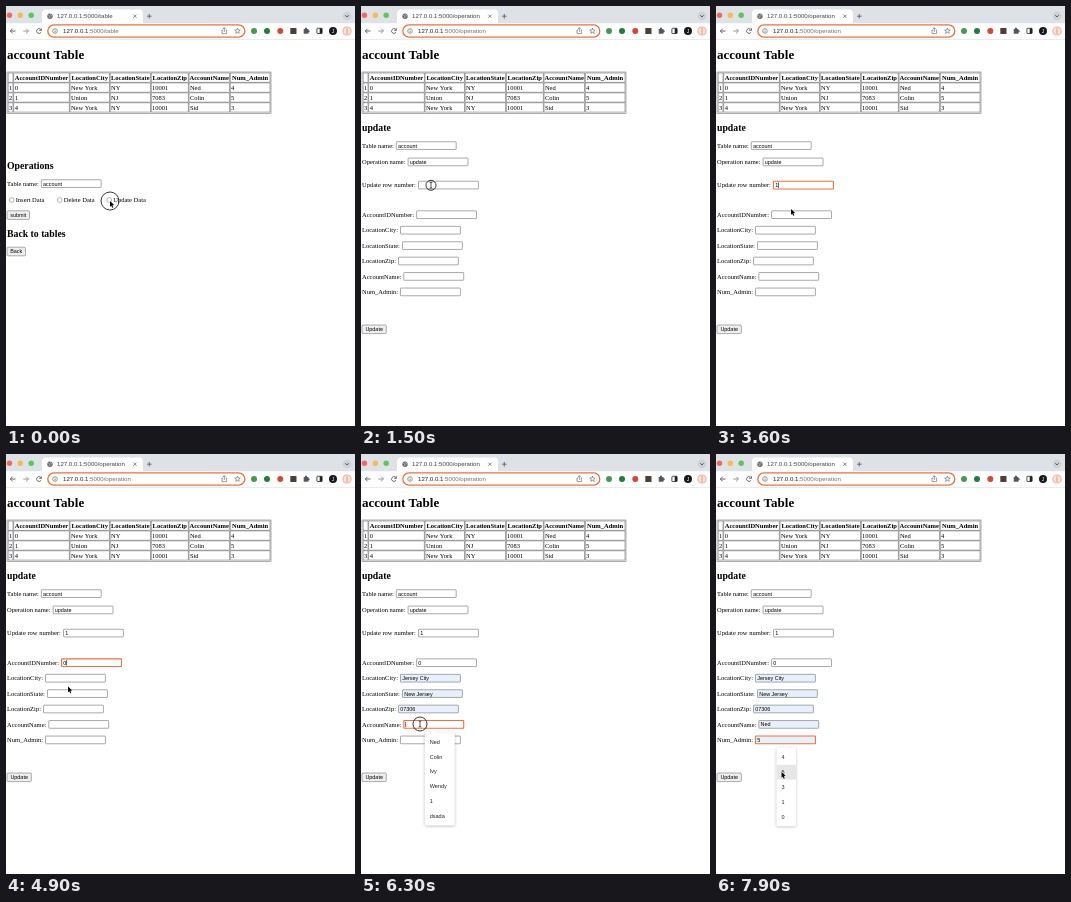
Write an HTML page with a canvas that moves like this. It is 349 px wide and 420 px high and loops after 8 s.

```html
<!DOCTYPE html>
<html lang="en">
<head>
<meta charset="utf-8">
<title>Table update form</title>
<style>
html, body { margin: 0; width: 349px; height: 420px; overflow: hidden; background: #fff; }
canvas { display: block; }
</style>
</head>
<body>
<canvas id="stage" width="349" height="420"></canvas>
<script>
const ctx = document.getElementById('stage').getContext('2d');
const LOOP = 8000;
const PAGE_SWITCH = 700;
const SANS = '"Liberation Sans", Arial, sans-serif';
const SERIF = '"Liberation Serif", "Times New Roman", serif';
const ACCENT = '#e8743f';
const FIELD_W = 60.5, FIELD_H = 8.5, ITEM_H = 14.85;

const columns = ['AccountIDNumber', 'LocationCity', 'LocationState', 'LocationZip', 'AccountName', 'Num_Admin'];
const edges = [1.7, 7.4, 63.6, 103.7, 144.8, 182.6, 223.8, 264.4];
const records = [
  ['0', 'New York', 'NY', '10001', 'Ned', '4'],
  ['1', 'Union', 'NJ', '7083', 'Colin', '5'],
  ['4', 'New York', 'NY', '10001', 'Sid', '3']
];

// y is the vertical centre of the input
const fields = {
  table: { label: 'Table name:', x: 35, y: 139.7 },
  operation: { label: 'Operation name:', x: 46.8, y: 156 },
  row: { label: 'Update row number:', x: 57.2, y: 179.2 },
  id: { label: 'AccountIDNumber:', x: 55.3, y: 208.8 },
  city: { label: 'LocationCity:', x: 39.2, y: 224.3 },
  state: { label: 'LocationState:', x: 41.2, y: 239.7 },
  zip: { label: 'LocationZip:', x: 37.2, y: 255.1 },
  name: { label: 'AccountName:', x: 42.5, y: 270.5 },
  admin: { label: 'Num_Admin:', x: 39.2, y: 286 }
};
const values = {
  table: { text: 'account', at: 0 },
  operation: { text: 'update', at: 0 },
  row: { text: '1', at: 3000 },
  id: { text: '0', at: 4500 },
  city: { text: 'Jersey City', at: 5550, filled: true },
  state: { text: 'New Jersey', at: 5550, filled: true },
  zip: { text: '07306', at: 5550, filled: true },
  name: { text: 'Ned', at: 6600, filled: true },
  admin: { text: '5', at: 7500, filled: true }
};
const focuses = [['row', 1600], ['id', 4100], ['city', 5100], ['name', 6200], ['admin', 7000]];
const popups = [
  { field: 'row', from: 1700, to: 3000, width: 20, items: ['1', '3', '4', '5', '2'] },
  { field: 'id', from: 4200, to: 4500, width: 20, items: ['0', '1', '4', '3', '5', '2'] },
  { field: 'city', from: 5200, to: 5700, width: 40, items: ['Jersey City', 'New York', 'Union'] },
  { field: 'name', from: 6250, to: 6700, width: 30, items: ['Ned', 'Colin', 'Ivy', 'Wendy', '1', 'dsada'] },
  { field: 'admin', from: 7100, to: LOOP, width: 19.5, items: ['4', '5', '3', '1', '0'] }
];
const clicks = [-200, 520, 1500, 4000, 5050, 6200, 6620, 6980];
const path = [
  [0, 104, 195], [150, 104, 195], [480, 17, 207], [1000, 17, 207], [1500, 70, 179.3],
  [3050, 70, 179.3], [3550, 75, 203], [3800, 75, 203], [4000, 68, 209], [4600, 68, 209],
  [4850, 62, 232.5], [4920, 62, 232.5], [5050, 60, 225], [5350, 60, 225], [5550, 61, 243],
  [5720, 61, 243], [6150, 59, 270], [6380, 59, 270], [6580, 70, 287], [6720, 70, 287],
  [6950, 65, 286], [7180, 65, 286], [7480, 65.5, 318], [LOOP, 65.5, 318]
];

function text(str, x, y, size, { color = '#000', family = SERIF, weight = '', align = 'left' } = {}) {
  ctx.font = `${weight} ${size}px ${family}`;
  ctx.fillStyle = color;
  ctx.textAlign = align;
  ctx.fillText(str, x, y);
  return ctx.measureText(str).width;
}
const heading = (str, y, size) => text(str, 1, y, size, { weight: 'bold' });
const body = (str, x, y) => text(str, x, y, 6.5);

function box(x, y, w, h, r, fill, stroke, line = 0.7) {
  ctx.beginPath();
  ctx.roundRect(x, y, w, h, r);
  paint(fill, stroke, line);
}
function disc(x, y, r, fill, stroke, line = 0.7) {
  ctx.beginPath();
  ctx.arc(x, y, r, 0, Math.PI * 2);
  paint(fill, stroke, line);
}
function paint(fill, stroke, line) {
  if (fill) { ctx.fillStyle = fill; ctx.fill(); }
  if (stroke) { ctx.strokeStyle = stroke; ctx.lineWidth = line; ctx.stroke(); }
}
function lines(color, width, ...polylines) {
  ctx.beginPath();
  for (const points of polylines) {
    points.forEach(([x, y], i) => i ? ctx.lineTo(x, y) : ctx.moveTo(x, y));
  }
  paint(null, color, width);
}

function drawBrowser(route) {
  const dark = '#55585c';
  ctx.fillStyle = '#dee1e6';
  ctx.fillRect(0, 0, 349, 17.5);
  disc(3.5, 9.3, 2.7, '#ee6a5f');
  disc(14.3, 9.3, 2.7, '#f5bd4f');
  disc(25.2, 9.3, 2.7, '#61c454');
  box(36, 3.5, 101, 20, 4, '#fff');
  ctx.fillStyle = '#fff';
  ctx.fillRect(0, 17.5, 349, 16);

  disc(44, 10.2, 2.7, '#666a6e');
  lines('#dfe1e4', 0.6, [[42.2, 9.2], [44, 10.4], [43.6, 12]], [[44.6, 8], [45, 9.6], [46.2, 10.2]]);
  text('127.0.0.1:5000/' + route, 51, 12.4, 6.1, { color: '#3c4043', family: SANS });
  lines(dark, 0.7, [[127.3, 8.6], [130.5, 11.8]], [[130.5, 8.6], [127.3, 11.8]]);
  lines(dark, 0.8, [[141, 10.2], [145.6, 10.2]], [[143.3, 7.9], [143.3, 12.5]]);
  disc(341, 10, 4.3, '#cdd0d5');
  lines('#3c4043', 0.8, [[339.3, 9.2], [341, 11], [342.7, 9.2]]);

  lines(dark, 0.9, [[9.5, 25], [4.3, 25]], [[6.7, 22.6], [4.3, 25], [6.7, 27.4]]);
  lines('#8b8e92', 0.9, [[17.3, 25], [22.5, 25]], [[20.1, 22.6], [22.5, 25], [20.1, 27.4]]);
  ctx.beginPath();
  ctx.arc(33, 25, 2.4, 0.5, 5.6);
  paint(null, dark, 0.9);
  lines(dark, 0.9, [[35.4, 22.3], [35.4, 24.4], [33.3, 24.4]]);

  box(41.8, 18.9, 197, 12.2, 6.1, '#fff', ACCENT, 1.3);
  disc(49, 25, 2.3, null, dark, 0.6);
  lines(dark, 0.7, [[49, 24.7], [49, 26.4]], [[49, 23.5], [49, 24.1]]);
  const hostWidth = text('127.0.0.1', 57, 27.2, 6.1, { color: '#202124', family: SANS });
  text(':5000/' + route, 57 + hostWidth, 27.2, 6.1, { color: '#6b6f73', family: SANS });

  lines(dark, 0.6, [[217, 24], [216, 24], [216, 27.6], [220.6, 27.6], [220.6, 24], [219.6, 24]],
    [[218.3, 26], [218.3, 21.8]], [[217, 23], [218.3, 21.7], [219.6, 23]]);
  const star = Array.from({ length: 11 }, (_, i) => {
    const r = i % 2 ? 1.3 : 2.9, a = i * Math.PI / 5 - Math.PI / 2;
    return [231.5 + r * Math.cos(a), 25 + r * Math.sin(a)];
  });
  lines(dark, 0.6, star);

  disc(248, 25, 3, '#4c9653');
  disc(261, 25, 3, '#257a3c');
  disc(274.3, 25, 3, '#cf4b36');
  box(284.3, 21.9, 6.2, 6.2, 0.5, '#4a4038');
  box(297.7, 23, 4.8, 4.8, 0.6, dark);
  disc(300, 22.7, 1.1, dark);
  disc(302.7, 25.3, 1.1, dark);
  box(310.9, 22.3, 5.2, 5.2, 0.5, '#fff', '#222', 0.8);
  ctx.fillStyle = '#222';
  ctx.fillRect(313.7, 22.3, 2.4, 5.2);
  disc(327, 25, 4, '#17191c');
  text('J', 327, 26.8, 5, { color: '#fff', family: SANS, align: 'center' });
  disc(341, 25, 4.1, '#fbe4da', '#e6805a', 0.6);
  for (const y of [23, 25, 27]) disc(341, y, 0.6, '#c4492b');

  ctx.fillStyle = '#dcdee1';
  ctx.fillRect(0, 33.2, 349, 0.6);
}

function drawTable() {
  heading('account Table', 53, 13);
  ctx.lineWidth = 0.6;
  ctx.strokeStyle = '#777';
  ctx.strokeRect(1, 66, 264, 41.3);
  [columns, ...records].forEach((cells, r) => {
    const y = 67 + r * 9.95, base = y + 7.2;
    [r || '', ...cells].forEach((cell, c) => {
      const left = edges[c] + 0.4, width = edges[c + 1] - edges[c] - 0.8;
      ctx.lineWidth = 0.55;
      ctx.strokeStyle = '#666';
      ctx.strokeRect(left, y, width, 9.2);
      if (r) body(cell, left + 0.9, base);
      else text(cell, left + width / 2, base, 6.5, { weight: 'bold', align: 'center' });
    });
  });
}

function drawInput(x, y, value, { focused, filled } = {}) {
  box(x + 0.3, y - FIELD_H / 2 + 0.3, FIELD_W - 0.6, FIELD_H - 0.8, 0.5,
    filled ? '#e8f0fe' : '#fff', focused ? ACCENT : '#858585', focused ? 1.1 : 0.7);
  return text(value, x + 2, y + 1.9, 5.45, { family: SANS });
}

function drawButton(label, y, width) {
  box(1, y, width, 8.6, 1, '#efefef', '#777', 0.6);
  text(label, 1 + width / 2, y + 6.2, 5.45, { family: SANS, align: 'center' });
}

function drawOperations(t) {
  heading('Operations', 163, 9.75);
  body('Table name:', 1, 179.7);
  drawInput(35, 177.7, 'account');
  [['Insert Data', 5.7], ['Delete Data', 53.7], ['Update Data', 103.2]].forEach(([label, x], i) => {
    const checked = i === 2 && t >= 100;
    disc(x, 194, 2.4, '#fff', checked ? ACCENT : '#858585', 0.6);
    if (checked) disc(x, 194, 1.4, ACCENT);
    body(label, x + 4, 196.3);
  });
  drawButton('submit', 204.8, 22.5);
  heading('Back to tables', 230.6, 9.75);
  drawButton('Back', 241.2, 18.5);
}

function drawForm(t) {
  heading('update', 125, 9.75);
  const [focusKey, focusTime] = focuses.filter(f => t >= f[1]).pop() || [];
  for (const [key, { label, x, y }] of Object.entries(fields)) {
    const value = values[key], set = t >= value.at, focused = key === focusKey;
    body(label, 1, y + 2);
    const width = drawInput(x, y, set ? value.text : '', { focused, filled: set && value.filled });
    const blinkOn = t - focusTime < 500 || t % 1000 >= 400;
    if (focused && blinkOn && !(set && value.filled)) {
      ctx.fillStyle = '#000';
      ctx.fillRect(x + 2 + width, y - 2.7, 0.6, 5.4);
    }
  }
  drawButton('Update', 319, 24.3);
}

function drawPopup(t, pointer) {
  const popup = popups.find(p => t >= p.from && t < p.to);
  if (!popup) return;
  const { x, y } = fields[popup.field];
  const middle = x + FIELD_W / 2, left = middle - 9, top = y + FIELD_H / 2 + 3.6;
  const height = 19 + ITEM_H * (popup.items.length - 1);
  ctx.save();
  ctx.shadowColor = 'rgba(0,0,0,.28)';
  ctx.shadowBlur = 3;
  ctx.shadowOffsetY = 0.6;
  box(left, top, popup.width, height, 1.2, '#fff');
  ctx.restore();
  ctx.beginPath();
  ctx.moveTo(middle - 2.5, top + 0.3);
  ctx.lineTo(middle, top - 2.2);
  ctx.lineTo(middle + 2.5, top + 0.3);
  paint('#fff');
  popup.items.forEach((item, i) => {
    const centre = top + 9.5 + i * ITEM_H;
    if (Math.abs(pointer.y - centre) < ITEM_H / 2 && pointer.x > left) {
      ctx.fillStyle = '#e6e6e6';
      ctx.fillRect(left, centre - ITEM_H / 2, popup.width, ITEM_H);
    }
    text(item, left + 5, centre + 1.9, 5.5, { color: '#222', family: SANS });
  });
}

function pointerAt(t) {
  const i = path.findIndex(p => p[0] > t);
  const [t0, x0, y0] = path[i - 1], [t1, x1, y1] = path[i];
  const k = (t - t0) / (t1 - t0), ease = k * k * (3 - 2 * k);
  return { x: x0 + (x1 - x0) * ease, y: y0 + (y1 - y0) * ease };
}

function drawPointer(t, { x, y }) {
  const age = t - clicks.filter(c => c <= t).pop();
  if (age < 300) disc(x, y, 5 + 4 * Math.min(1, age / 200), null, '#222', 0.9);

  const overInput = t >= PAGE_SWITCH && Object.values(fields).some(f =>
    x >= f.x && x <= f.x + FIELD_W && Math.abs(y - f.y) <= FIELD_H / 2);
  const covered = popups.some(p => t >= p.from && t < p.to && y > fields[p.field].y + 8);
  if (overInput && !covered) {
    lines('#111', 0.7, [[x, y - 2.7], [x, y + 2.7]],
      [[x - 1.4, y - 3.1], [x, y - 2.6], [x + 1.4, y - 3.1]],
      [[x - 1.4, y + 3.1], [x, y + 2.6], [x + 1.4, y + 3.1]]);
    return;
  }
  const arrow = [[0, 0], [0, 5.8], [1.3, 4.6], [2.2, 6.7], [3.2, 6.2], [2.3, 4.2], [4.1, 4.1]];
  ctx.beginPath();
  for (const [dx, dy] of arrow) ctx.lineTo(x + dx, y + dy);
  ctx.closePath();
  paint('#000', '#fff', 0.9);
  ctx.fill();
}

function render() {
  const t = performance.now() % LOOP;
  const pointer = pointerAt(t);
  const onForm = t >= PAGE_SWITCH;
  ctx.fillStyle = '#fff';
  ctx.fillRect(0, 0, 349, 420);
  drawBrowser(onForm ? 'operation' : 'table');
  drawTable();
  if (onForm) drawForm(t);
  else drawOperations(t);
  drawPopup(t, pointer);
  drawPointer(t, pointer);
  requestAnimationFrame(render);
}
render();
</script>
</body>
</html>
```
